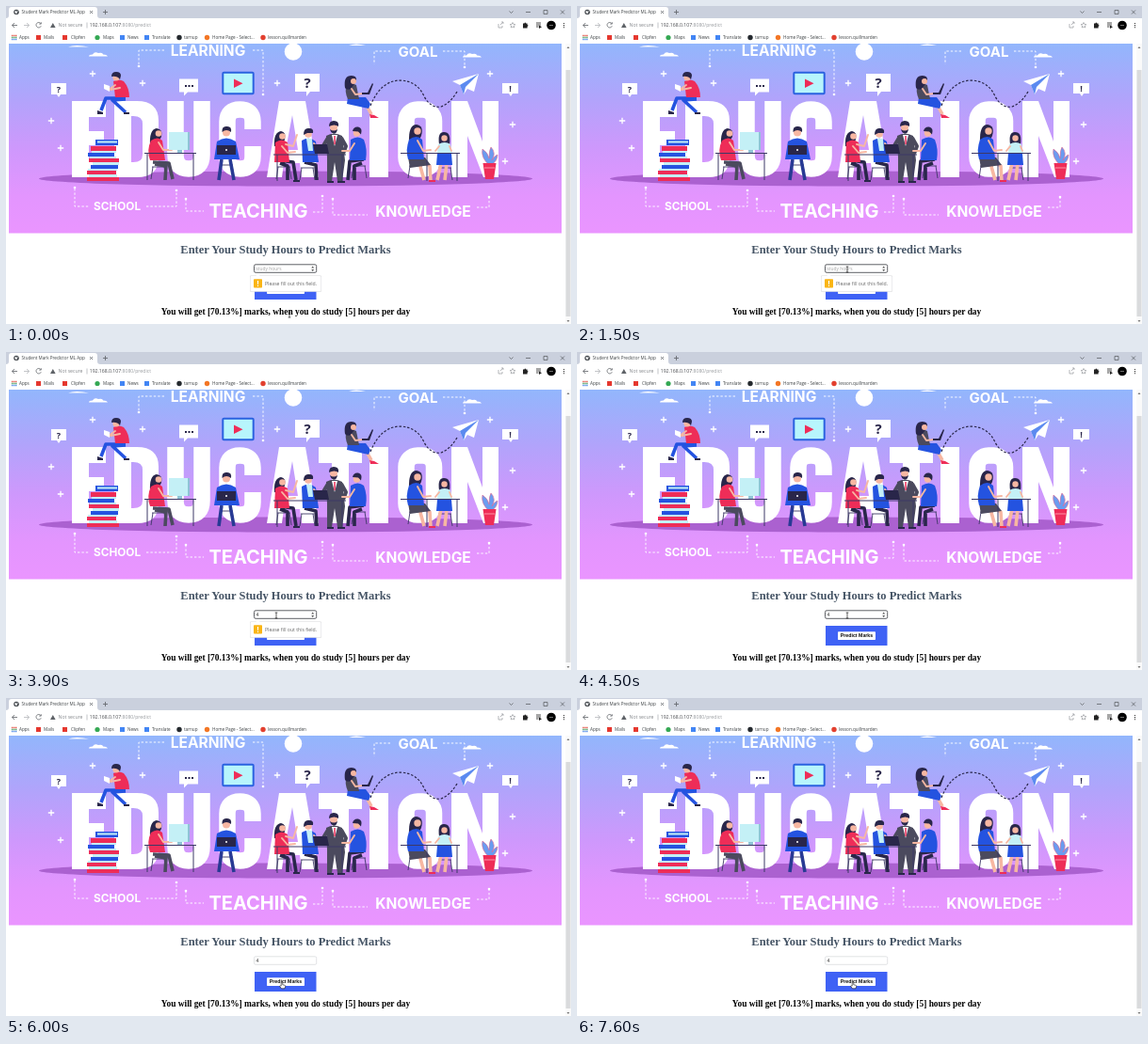
An HTML page that plays this animation: 600x338 px, repeating every 8 s.

```html
<!DOCTYPE html>
<html lang="en">
<head>
<meta charset="utf-8">
<title>Student Mark Predictor ML App</title>
<style>
html,body{margin:0;width:100%;height:100%;overflow:hidden;background:#fff}
svg{display:block;width:100%;height:100%;font-family:"Open Sans","Noto Sans",sans-serif}
.ui{font-size:4.6px;fill:#3c4043}
.url{font-size:5.15px}
.big{font-family:Inter,Roboto,sans-serif;font-weight:700;fill:#fff;text-anchor:middle}
.serif{font-family:"Liberation Serif","Noto Serif",serif;font-weight:700;text-anchor:middle}
.button{font:700 5.25px "Liberation Sans",sans-serif;text-anchor:middle}
.line{fill:none;stroke:#5f6368;stroke-width:.8}
.dash{fill:none;stroke:#fff;stroke-width:.9;stroke-dasharray:2.4 2}
.w{fill:#fff}.r{fill:#ee2d58}.b{fill:#2453e0}.k{fill:#29264a}.s{fill:#f7b7a2}.g{fill:#4b4a5e}.c{fill:#c4f0f6}
.leg{fill:none;stroke-width:3.6;stroke-linejoin:round}
.arm{fill:none;stroke:#f7b7a2;stroke-width:1.9;stroke-linecap:round;stroke-linejoin:round}
.desk{fill:none;stroke:#3d3866;stroke-width:1}
.chair{fill:none;stroke:#3d3866;stroke-width:.9}

/* one loop is 8 s; step-end keeps the hard changes */
.focus,.hint,.typed,.blur,.tip,.caret,.beam,.hand{animation:8s step-end infinite}
.focus{animation-name:focus}.blur{animation-name:blur}
.hint{animation-name:hint}.typed{animation-name:typed}
.tip{animation-name:tip}.caret{animation-name:caret}
.beam{animation-name:beam}.hand{animation-name:hand}
.mouse{animation:move 8s ease-in-out infinite}
@keyframes focus{0%{opacity:1}67.5%,to{opacity:0}}
@keyframes blur{0%{opacity:0}67.5%,to{opacity:1}}
@keyframes hint{0%{opacity:1}48.75%,to{opacity:0}}
@keyframes typed{0%{opacity:0}48.75%,to{opacity:1}}
@keyframes tip{0%{opacity:1}53.75%,to{opacity:0}}
@keyframes caret{0%{opacity:0}27.5%{opacity:1}36.25%{opacity:0}42.5%{opacity:1}46.25%,to{opacity:0}}
@keyframes beam{0%{opacity:1}11%{opacity:0}15%{opacity:1}59%,to{opacity:0}}
@keyframes hand{0%{opacity:0}11%{opacity:1}15%{opacity:0}59%,to{opacity:1}}
@keyframes move{
  0%,1.25%{transform:translate(301px,328px)}
  3.75%,8.75%{transform:translate(302px,325px)}
  16.25%{transform:translate(288px,281px)}
  18.75%,56.25%{transform:translate(287px,280px)}
  62.5%,to{transform:translate(293px,305px)}
}
</style>
</head>
<body>
<svg viewBox="0 0 600 338" preserveAspectRatio="none">
<defs>
  <linearGradient id="sky" x2="0" y2="1">
    <stop stop-color="#92b6fc"/><stop offset=".3" stop-color="#b2a3fb"/>
    <stop offset=".55" stop-color="#ce98fc"/><stop offset=".8" stop-color="#e395fe"/><stop offset="1" stop-color="#ea95ff"/>
  </linearGradient>
  <path id="plus" d="M-3.2 0H3.2M0-3.2V3.2" stroke="#fff" stroke-width="1.3"/>
  <path id="cloud" class="w" d="M-10 1.500q0-2 4-2q2-3.500 6-1.500q5-1 5 1.500q4 0 5 2z"/>
  <path id="seat" class="chair" d="M-7 0H7M-6 0L-8 13M6 0L8 13"/>
</defs>

<!-- browser -->
<path d="M0 0H600V13H0z" fill="#cad0dd"/>
<path class="w" d="M0 13Q3 13 3 10V4Q3 1 6 1H94Q97 1 97 4V10Q97 13 100 13H600V40H0z"/>
<circle cx="11" cy="6.500" r="2.800" fill="#4a4e53"/>
<path class="w" d="M9 6l2-1 1 1.500-1 2zM12 4.500l1.200 1-.8.3z"/>
<text class="ui" x="16.600" y="8.200">Student Mark Predictor ML App</text>
<path class="line" d="M89 5l3 3m0-3l-3 3M103 6.500h5M105.500 4v5M534.500 5.500l2 2 2-2M552 6.500h5M571 4.500h4v4h-4zM589 4.500l4 4m0-4l-4 4"/>
<path class="line" d="M12 20.500H6.500m2.500-2.500l-2.500 2.500 2.500 2.500M36.800 18.500a2.700 2.700 0 1 0 .4 2.800m.1-4v1.800h-2"/>
<path class="line" style="stroke:#b4b6ba" d="M19 20.500h5.500m-2.500-2.500l2.500 2.500-2.500 2.500M86 17.500v6"/>
<path d="M47 23l2.800-5 2.800 5z" fill="#5f6368"/>
<g class="url">
  <text x="55.500" y="22.300" fill="#85888c">Not secure</text>
  <text x="88.700" y="22.300" fill="#4a4c50">192.168.0.107<tspan fill="#9a9da1">:8080/predict</tspan></text>
</g>
<path class="line" style="stroke:#a2a5a9" d="M523 19v4h4v-2M525 20l3-3m-2 0h2v2M538 17.500l.9 1.900 2 .2-1.500 1.400.4 2-1.800-1-1.800 1 .4-2-1.500-1.400 2-.2z"/>
<path class="line" style="stroke:#222" d="M563 18h5m-5 2h5m-5 2h2.500"/>
<path fill="#222" d="M549 18.500h1.500q.8-2 1.600 0h1.500v1.600q2 .8 0 1.600v1.700H549zM566 20.500l3 1.700-3 1.700z"/>
<circle cx="579" cy="20.500" r="4.800"/>
<path d="M577 20.500h4" stroke="#bbb" stroke-width=".6"/>
<path d="M592.500 18v5.500" stroke="#333" stroke-width="1.100" stroke-dasharray="1.100 1"/>
<g stroke-width="1.300" stroke-dasharray="1.300 .7">
  <path d="M6 31.500h5.300" stroke="#e2493b"/><path d="M6 33.500h5.300" stroke="#3f9a59"/><path d="M6 35.500h5.300" stroke="#4380e6"/>
</g>
<path d="M32 31h5v5h-5zM60 31h5v5h-5z" fill="#e5382f"/>
<circle cx="97" cy="33.500" r="2.600" fill="#34a853"/>
<path d="M121 31h5v5h-5zM147 31h5v5h-5z" fill="#4285f4"/>
<circle cx="184" cy="33.500" r="2.700" fill="#24292e"/>
<circle cx="213.500" cy="33.500" r="2.700" fill="#f37726"/>
<circle cx="273" cy="33.500" r="2.700" fill="#e2402f"/>
<g class="ui">
  <text x="14" y="35.200">Apps</text><text x="40" y="35.200">Mails</text><text x="69" y="35.200">Clipfen</text>
  <text x="103" y="35.200">Maps</text><text x="129" y="35.200">News</text><text x="155" y="35.200">Translate</text>
  <text x="189" y="35.200">tarnup</text><text x="219" y="35.200">Home Page - Select...</text>
  <text x="278" y="35.200">lesson.quillmarden</text>
</g>
<path d="M594 40h6v298h-6z" fill="#fafafa"/>
<path d="M595.500 45l1.500-2 1.500 2zM595.500 334l1.500 2 1.500-2z" fill="#777"/>
<path d="M594.500 68h5v262h-5z" fill="#dadbdd"/>

<!-- banner -->
<path d="M3 40H590V241.500H3z" fill="url(#sky)"/>
<g class="big">
  <text x="214.500" y="53" font-size="15.500">LEARNING</text>
  <text x="437.500" y="54" font-size="15">GOAL</text>
  <text x="118" y="217" font-size="11.800">SCHOOL</text>
  <text x="268" y="224.500" font-size="20">TEACHING</text>
  <text x="443" y="224" font-size="15.600">KNOWLEDGE</text>
</g>
<path class="dash" d="M168 47H141V63M262 47h11V93M408 48H391V62M464 48h23v16M73 194v19h15M149 213h32v-17M191 205v13h19M326 219h10v-17M347 205v17h37M500 214h13v-11"/>
<g class="w">
  <circle cx="305" cy="48.500" r="9.300"/>
  <circle cx="141" cy="64" r="1.300"/><circle cx="273" cy="94" r="1.300"/><circle cx="487" cy="65" r="1.300"/>
  <circle cx="73" cy="193" r="1.300"/><circle cx="181" cy="196" r="1.300"/><circle cx="191" cy="205" r="1.300"/>
  <circle cx="336" cy="202" r="1.300"/><circle cx="347" cy="205" r="1.300"/><circle cx="513" cy="203" r="1.300"/>
</g>
<path class="w" d="M66 43.500q8-3 22 0zM364 42q7-3 18 0z"/>
<use href="#cloud" x="98" y="52"/><use href="#cloud" x="495" y="53"/>
<use href="#plus" x="92" y="72"/><use href="#plus" x="48" y="122"/><use href="#plus" x="58" y="151"/><use href="#plus" x="288" y="82"/>
<use href="#plus" x="145" y="82"/><use href="#plus" x="514" y="72"/><use href="#plus" x="538" y="126"/><use href="#plus" x="530" y="165"/>
<ellipse cx="297" cy="183.500" rx="262" ry="8" fill="#ab61d0"/>
<g class="w" fill-rule="evenodd">
  <path d="M70 101h36v17H88v15h16v15H88v17h18v17H70zM115 101h24q23 0 23 21v39q0 21-23 21h-24zM133 117v49q12 1 12-8v-33q0-9-12-8z"/>
  <path d="M277 182l13-81h28l14 81h-18l-2-15h-17l-2 15zM297 153h13l-6-37zM332 101h46v17h-14v64h-18v-64h-14zM386 101h20v81h-20zM473 101h17l16 43v-43h17v81h-16l-17-44v44h-17z"/>
  <path d="M48 82h16v12h-6l-2 3-2-3h-6zM184 77.500h20v14h-11l-4 4v-4h-5zM307 72h26v19h-10l-4 5v-5h-12zM527 82h17v11h-6l-2 3-2-3h-7z"/>
</g>
<g fill="none" stroke="#fff" stroke-width="17.500">
  <path d="M180 101v57q0 15 14 15t14-15v-57M262 131v-8q0-13-13.500-13T235 123v37q0 13 13.500 13T262 160v-11"/>
  <rect x="425" y="110" width="29.500" height="63" rx="12"/>
</g>
<g font-weight="700" text-anchor="middle" fill="#29264a">
  <text x="56" y="91.500" font-size="9">?</text><text x="320" y="87" font-size="15">?</text><text x="535.500" y="91" font-size="9">!</text>
</g>
<path d="M190 85h9" stroke="#29264a" stroke-width="2" stroke-dasharray="2 1.500"/>
<rect x="230.300" y="70.800" width="32.400" height="22.400" rx="1" fill="#b7f5fc" stroke="#2a62e0" stroke-width="2"/>
<path class="r" d="M242 77.500l9.500 4.700-9.500 4.800z"/>
<path fill="none" stroke="#29264a" stroke-width="1.200" stroke-dasharray="2.500 1.800" d="M387 106Q398 79 419 79Q437 80 444 96Q451 109 462 107Q472 103 479 91"/>
<path class="w" d="M502 72l-28 8 8 4 4 10 4-6 7 3z"/><path fill="#5b8af0" d="M502 72l-20 12 4 10 2-8z"/>

<!-- boy reading on the E -->
<path class="leg" stroke="#2453e0" d="M127 98H106l-5 13M127 99l-14 1 14 13" stroke-width="4"/>
<path class="r" d="M114 80q6-3 11 0 6 7 6 17h-15z"/>
<path class="arm" d="M116 84l-7 5M121 87l-10 2"/>
<circle class="s" cx="117" cy="76" r="3.600"/><path class="k" d="M112 75q0-5 5-5t5 4l-1 4q-3-4-9-3z"/>
<path class="w" d="M104 83l6 2v6l-6-3z"/><path class="k" d="M97 111l6 2v2h-6zM125 113h6v2h-6z"/>

<!-- woman on the I -->
<path class="leg" stroke="#f7b7a2" d="M376 103l7 3 5 9" stroke-width="2.600"/>
<path class="b" d="M363 97h19l5 7-2 5-23-5z"/>
<path class="g" d="M362 83q5-2 10 1l3 15h-12q-4-9-1-16z"/>
<path class="k" d="M360 87q-2-13 7-13 6 0 5 6l-6 8q-4 2-6-1z"/>
<circle class="s" cx="369" cy="80" r="3"/><path class="arm" d="M367 88l4 6 9-1"/>
<path class="k" d="M378 94h8l4-11-1-1-5 10h-6z"/><path class="r" d="M386 115l5 1 5 3h-9z"/>

<!-- books -->
<g class="b"><path d="M95 142h24v6H95zM87 156h28v4H87zM90 169h29v4H90z"/></g>
<g class="r"><path d="M90 149h27v5H90zM88 162h32v4H88zM86 175h31v4H86zM86 182h34v4H86z"/></g>
<g class="c"><path d="M97 143.500h21v2H97zM91 154h26v2H91zM89 160h28v2H89zM92 166h28v3H92zM87 173h31v2H87zM88 179h30v3H88z"/></g>

<!-- desk with a computer -->
<use href="#seat" x="162" y="171"/>
<path class="leg" stroke="#4b4a5e" d="M156 166l17 1 4 17M158 168l12 2-1 15" stroke-width="4.400"/>
<path class="k" d="M153 148q-1-17 7-18 7 1 5 9l-5 9z"/>
<path class="r" d="M154 143q7-5 12 0l3 21h-16q-4-11 1-21z"/>
<circle class="s" cx="162" cy="135.500" r="3.300"/><path class="arm" d="M162 145l5 8 9 0"/>
<path class="c" d="M173 134h22v19h-22z"/><path d="M193 134h2v19h-2zM182 153h5v3h-5z" fill="#8fc3d6"/>
<path class="desk" d="M147 156.500h55M150 156v29M199 156v29"/>

<!-- man with a laptop -->
<use href="#seat" x="234" y="169"/>
<path class="leg" stroke="#283a94" d="M229 163l-3 22M238 163l4 22" stroke-width="5.400"/>
<path class="b" d="M224 144q10-7 20 0l4 19h-27z"/>
<circle class="s" cx="234" cy="134.500" r="4"/><path class="k" d="M229.500 134q-.5-7 5.500-6 5 0 4 6-5-4-9.500 0z"/>
<path class="k" d="M224 148h20v10h-20z"/><circle class="w" cx="234" cy="153" r="1"/>

<!-- meeting -->
<use href="#seat" x="295" y="171"/><use href="#seat" x="320" y="172"/><use href="#seat" x="375" y="170"/>
<path class="leg" stroke="#29264a" d="M290 164l15 2 3 19M317 166l12 3 1 16M291 167l8 3v15M380 163l-15 2-2 20M378 167l-8 3v15"/>
<path class="k" d="M285 149q-1-15 7-16 6 1 4 9l-4 8z"/>
<path class="r" d="M286 145q7-5 13 0l2 21h-16z"/>
<circle class="s" cx="293.500" cy="138.500" r="3.300"/><path class="arm" d="M297 147l8 2 4-12M293 149l6 7 8-1"/>
<path class="b" d="M314 143q8-5 15 1l3 22h-17z"/><path class="c" d="M319 141h6l1 13h-5z"/>
<circle class="s" cx="321" cy="136" r="3.800"/><path class="k" d="M316 137q0-8 6-7 5 0 4 5l-6 0z"/>
<path class="arm" d="M327 146l5 7 6-1"/>
<path class="g" d="M340 138q8-5 17 0l3 26-3 22h-5l-3-20-3 20h-5v-25z"/>
<path fill="none" stroke="#4b4a5e" stroke-width="4" stroke-linejoin="round" d="M342 140l-6 10 4 6M356 140l5 9-3 8"/>
<path class="w" d="M346 137h6l-3 12z"/><path class="r" d="M348.300 138h1.500v9h-1.500z"/>
<circle class="s" cx="348" cy="129" r="4"/>
<path class="k" d="M343 128q0-6 5-6 6 0 5 6-4-3-10 0zM344 131q4 3 8 0-1 5-4 4.500t-4-4.500z"/>
<path class="b" d="M366 142q8-5 14 0 4 10 2 22h-17z"/>
<circle class="s" cx="372.500" cy="135" r="3.700"/><path class="k" d="M368 133q1-5 6-4.500 5 1 3 8l-3-3z"/>
<path class="arm" d="M370 146l-5 8-8 0"/>
<path class="k" d="M326 147h15l2 10h-15zM341 186h7v2h-7zM352 186h8v2h-8zM305 185h7v2h-7z"/>
<path class="desk" d="M284 158h77M288 158v28M357 158v28"/>

<!-- two at a table -->
<use href="#seat" x="435" y="170"/><use href="#seat" x="466" y="172"/>
<path class="leg" stroke="#f7b7a2" d="M443 166l7 4 1 16M439 167l5 18M462 167l-4 18M468 167l-2 18" stroke-width="2.400"/>
<path class="g" d="M427 161h18l6 8-22 3z"/>
<path class="k" d="M428 146q-1-20 8-20 8 1 5 12l-6 12z"/>
<path class="b" d="M428 142q8-6 14 0l2 21h-17q-3-10 1-21z"/>
<circle class="s" cx="437" cy="133" r="3.700"/><path class="arm" d="M437 143l6 11 8-1"/>
<path class="k" d="M460 147q-2-13 5-13 8 0 6 13z"/>
<path class="c" d="M459 147q7-4 13 0l2 10h-16z"/><path class="b" d="M458 157h15l1 12h-17z"/>
<circle class="s" cx="465.500" cy="140.500" r="3.200"/><path class="arm" d="M460 149l-4 5M471 149l2 5"/>
<path class="desk" d="M419 156.500h63M447 156v30M479 156v30"/>
<path class="r" d="M449 185h7v2h-7z"/>

<!-- plant -->
<path fill="#6a9cf0" stroke="#e2658f" stroke-width=".6" d="M513 169q-9-8-7-17 6 4 7 10 0-9 2-12 6 6 1 14 3-5 6-6 0 7-7 11z"/>
<path class="r" d="M506.500 167h14l-2.500 17h-9z"/><path d="M508 172h11" stroke="#ff91a5"/>

<!-- form -->
<text class="serif" x="297" y="263" font-size="12.480" fill="#455465">Enter Your Study Hours to Predict Marks</text>
<g class="w">
  <rect class="focus" x="263.500" y="274.800" width="66.200" height="8.500" rx="1.600" stroke="#4c4f54" stroke-width=".9"/>
  <rect class="blur" x="263.500" y="274.800" width="66.200" height="8.500" rx="1.500" stroke="#d4d7da" stroke-width=".7"/>
</g>
<text class="hint" x="265.500" y="281" font-size="4.900" fill="#a0a0a0">study hours</text>
<path class="caret" d="M265.700 276.500v5.500" stroke="#111" stroke-width=".6"/>
<text class="typed" x="265.500" y="281.200" font-size="5.100" fill="#222">4</text>
<path class="focus" fill="#555" d="M324.300 278.500l1.400-2 1.400 2zM324.300 280l1.400 2 1.400-2z"/>
<path d="M264 291h65.500v21H264z" fill="#3f62f5"/>
<rect class="w" x="277" y="297.300" width="40" height="8.700" rx=".8"/>
<text class="button" x="297" y="303.200" fill="#111">Predict Marks</text>
<g class="tip">
  <rect x="259" y="286.600" width="76" height="17.200" rx="1" fill="#d9d9dc"/>
  <rect class="w" x="259.500" y="287" width="75" height="16.300" rx="1"/>
  <path class="w" d="M265 287.300l2.500-2.500 2.500 2.500z"/>
  <rect x="263" y="290.300" width="9" height="9.200" rx=".8" fill="#fab515"/>
  <path d="M267.500 292v3.800m0 1v1.200" stroke="#fff" stroke-width="1.200"/>
  <text x="275" y="297" font-size="5.150" fill="#666">Please fill out this field.</text>
</g>
<text class="serif" x="297" y="328" font-size="9.400">You will get [70.13%] marks, when you do study [5] hours per day</text>

<g class="mouse">
  <path class="beam" d="M-1.300-3h2.600M0-3v6M-1.300 3h2.600" stroke="#222" stroke-width=".7"/>
  <path class="hand" d="M-.8-2.500q.8-1 1.500 0v2.200l2.400.6q.8.300.6 1.200l-.7 2.300h-3.500l-2-2.500q.3-1 1.700-.2z" fill="#fff" stroke="#111" stroke-width=".6"/>
</g>
</svg>
</body>
</html>
```
